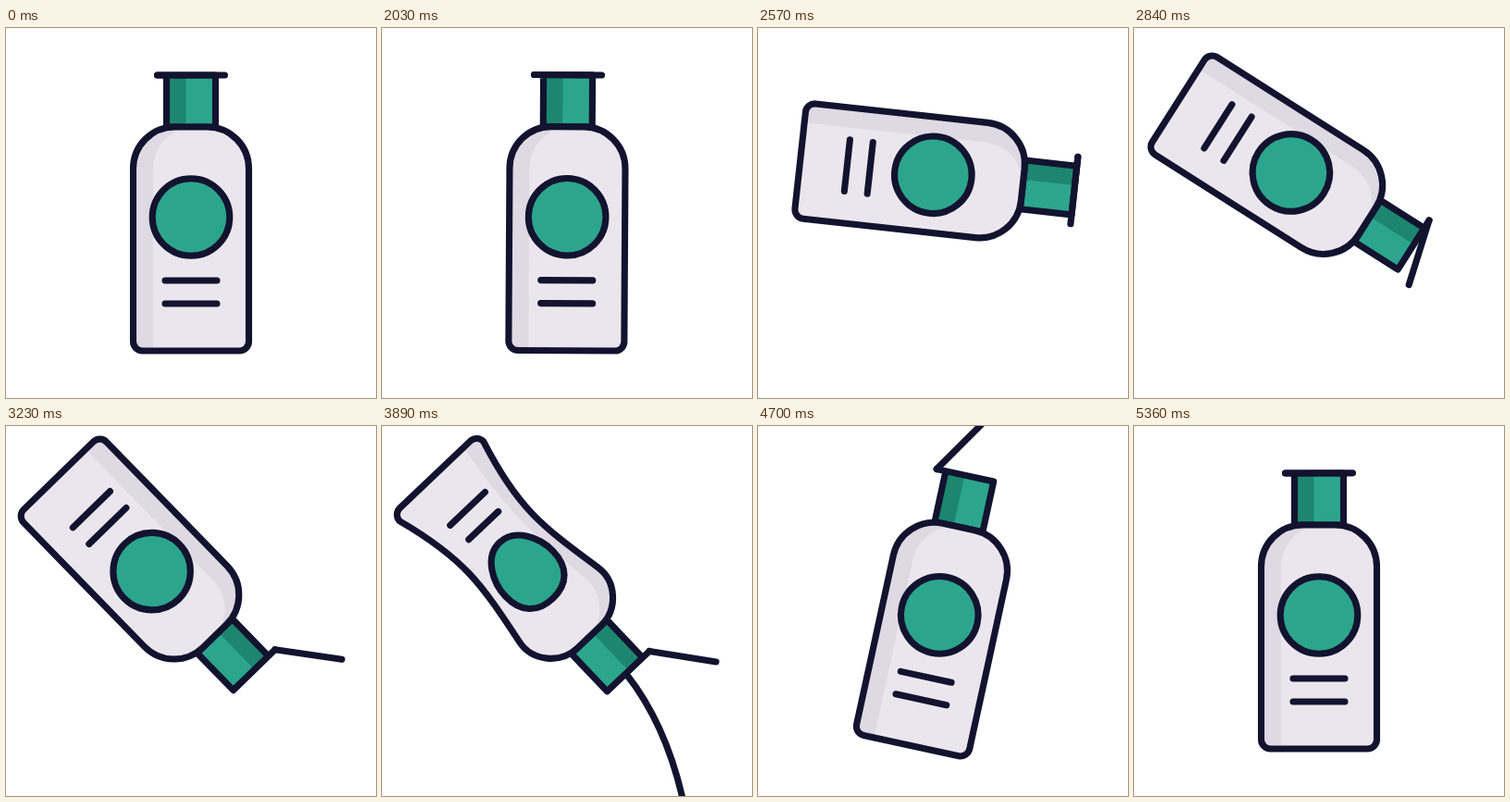
An HTML page that plays this animation: 400x400 px, repeating every 5.39 s.

```html
<!DOCTYPE html>
<html lang="en">
<head>
<meta charset="utf-8">
<title>Pouring bottle</title>
<style>
  html, body { margin: 0; width: 100%; height: 100%; overflow: hidden; background: #fff; }
  svg { display: block; width: 100vw; height: 100vh; }
  .ink { stroke: #12132f; stroke-width: 7.1; stroke-linecap: round; stroke-linejoin: round; }
</style>
</head>
<body>
<svg viewBox="0 0 400 400">
  <defs><clipPath id="inside"><path id="clip"/></clipPath></defs>
  <path id="stream" class="ink" fill="none" d="M264 268Q309 325 327 412"/>
  <g id="bottle">
    <path fill="#2ca58d" d="M-26.5-149h53v56h-53z"/>
    <path fill="#1d866f" d="M-26.5-149h21v56h-21z"/>
    <path class="ink" fill="none" d="M-36.5-149h63v56h-53v-56"/>
    <path id="lid" class="ink" d="M-36.5-149h73"/>
    <path id="shade" fill="#dfd9e3"/>
    <path id="light" fill="#ebe6ed" clip-path="url(#inside)"/>
    <path id="outline" class="ink" fill="none"/>
    <path id="badge" class="ink" fill="#2ca58d"/>
    <path id="lines" class="ink"/>
  </g>
</svg>
<script>
const LOOP = 5390, TILT = 136.5;
const $ = id => document.getElementById(id);
const mix = (a, b, k) => a + (b - a) * k;

function bezier(x1, y1, x2, y2) {
  const at = (a, b, s) => 3 * a * s * (1 - s) ** 2 + 3 * b * s * s * (1 - s) + s ** 3;
  return x => {
    if (x <= 0) return 0;
    if (x >= 1) return 1;
    let lo = 0, hi = 1;
    for (let i = 0; i < 24; i++) {
      const mid = (lo + hi) / 2;
      if (at(x1, x2, mid) < x) lo = mid; else hi = mid;
    }
    return at(y1, y2, lo);
  };
}

const swing = bezier(.27, 0, .2, 1);
const smooth = bezier(.42, 0, .58, 1);
const snap = bezier(.25, .1, .25, 1);
const fall = bezier(.4, 0, .8, 1);
const during = (t, from, to, ease) => ease((t - from) / (to - from));

// Body outline, squeezed at the waist by k (0..1).
function body(k) {
  const x = mix(62.5, 58.5, k), y = mix(-48, -45, k), bulge = mix(62.5, 63, k),
        a = mix(62.5, 45, k), b = mix(62.5, 40, k);
  return `M-17.5-93H17.5C42.4-93 ${bulge} ${y - 25} ${x} ${y}C${a} 30 ${b} 62 62.5 139` +
    `A10 10 0 0 1 52.5 149H-52.5A10 10 0 0 1-62.5 139` +
    `C${-b} 62 ${-a} 30 ${-x} ${y}C${-bulge} ${y - 25}-42.4-93-17.5-93Z`;
}

// Lit area: the left edge moved inwards.
function lit(k) {
  const a = mix(41, 32, k), b = mix(41, 30, k);
  return `M70-93H4C-21-93-41-73-41-48C${-a} 30 ${-b} 62-41 139V150H70Z`;
}

// Round badge that turns egg-shaped with k.
function badge(k) {
  const r = 41.8, w = mix(r, 35.5, k), mid = mix(0, -5, k),
        top = mix(-23, -28, k), low = mix(23, 15, k);
  return `M0 ${-r}C23 ${-r} ${w} ${top} ${w} ${mid}C${w} ${low} 23 ${r} 0 ${r}` +
    `C-23 ${r} ${-w} ${low} ${-w} ${mid}C${-w} ${top}-23 ${-r} 0 ${-r}Z`;
}

const stream = $("stream"), length = stream.getTotalLength();

function draw(t) {
  const pouring = t < 3950;
  const p = pouring ? during(t, 2000, 3365, swing) : 1 - during(t, 3950, 4900, smooth);
  const [x, y] = pouring
    ? [p * (75 - 128 * p + 13 * p * p), p * (62 * p - 101.5)]
    : [-p * (30.3 + 9.7 * p), p * (3.5 - 43 * p)];
  $("bottle").setAttribute("transform", `translate(${200 + x} ${200 + y}) rotate(${TILT * p})`);

  const open = during(t, 2805, 3120, snap) - during(t, 3925, 5390, smooth);
  $("lid").setAttribute("transform", `rotate(${-127.4 * open} -36.5 -149)`);

  const k = during(t, 3300, 3700, smooth) - during(t, 3950, 4250, smooth);
  const shape = body(k);
  for (const id of ["clip", "shade", "outline"]) $(id).setAttribute("d", shape);
  $("light").setAttribute("d", lit(k));
  $("badge").setAttribute("d", badge(k));
  $("badge").setAttribute("transform", `translate(0 ${mix(4.5, 6, k)})`);
  const w1 = mix(28, 22, k), w2 = mix(28, 26, k);
  $("lines").setAttribute("d", `M${-w1} 73H${w1}M${-w2} 98H${w2}`);

  const head = length * during(t, 3400, 3610, fall);
  const tail = length * during(t, 3895, 4220, fall);
  const shown = head - tail;
  stream.style.visibility = shown > .5 ? "visible" : "hidden";
  stream.setAttribute("stroke-dasharray", `0 ${tail} ${shown} ${length * 2}`);
}

const start = performance.now();
function tick() {
  draw((performance.now() - start) % LOOP);
  requestAnimationFrame(tick);
}
tick();
</script>
</body>
</html>
```
